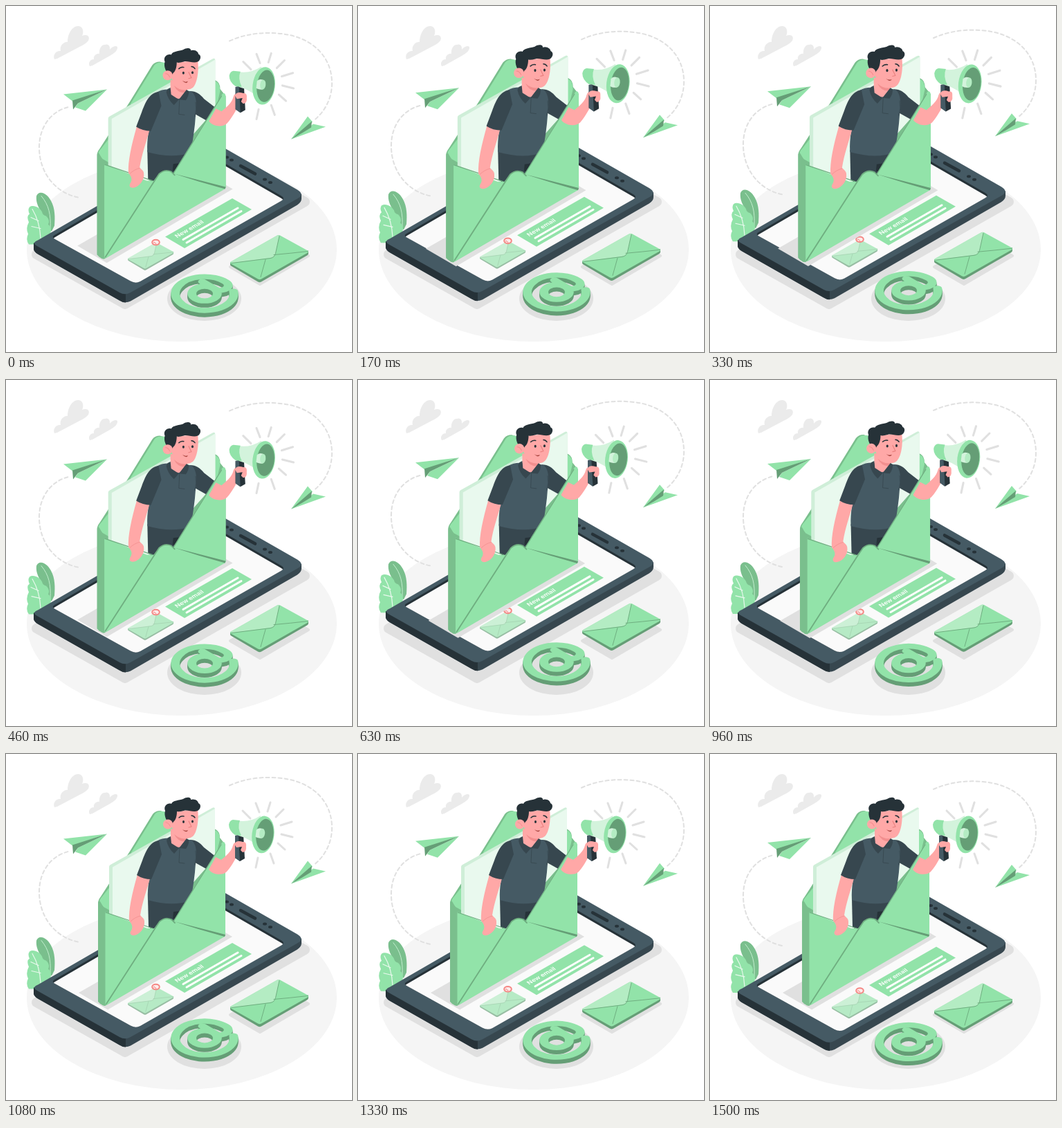
Animation of 500x500 px, one loop 1.54 s. Source, as an HTML page:

```html
<!DOCTYPE html>
<html lang="en">
<head>
<meta charset="utf-8">
<title>New email</title>
<style>
html, body { margin: 0; width: 100%; height: 100%; overflow: hidden; background: #fff; }
svg { display: block; width: 100%; height: 100%; }
.g { fill: #92e3a9; } .m { fill: #7abf8d; } .d { fill: #659e76; }
.k { fill: #263238; } .n { fill: #37474f; } .t { fill: #455a64; }
.s { fill: #ffa8a7; } .sh { fill: #e0e0e0; } .c { fill: #ebebeb; }
.line { fill: none; stroke-linecap: round; stroke-linejoin: round; }
.dash { fill: none; stroke: #e0e0e0; stroke-width: 2; stroke-dasharray: 5 4; stroke-linecap: round; }
</style>
</head>
<body>
<svg viewBox="0 0 500 500">
<defs>
  <clipPath id="hole"><path id="rim" d="M71 331 L282 208 L398 275 Q404 278.500 398 282 L194 398.500 Q187 402 180 398 L70 337 Q65 334 71 331Z"/></clipPath>
  <g id="mail">
    <path class="d" d="M324 371 L324 374 Q324 375.500 326 376.500 L364 399 Q366.500 400.500 369 399 L435 361 Q437 360 437 358 L437 354Z"/>
    <path class="g" d="M325 370 L392 332 Q394 331 396 332 L436 354 Q438 355.500 436 357 L369 395 Q366.500 396.500 364 395 L325 373 Q323 371.500 325 370Z"/>
    <path fill="#b4ecc3" d="M325 370 L392 332 Q394 331 395 332.500 L389.500 358 Q388 363.500 382 364.500 L326 372Z"/>
    <path class="line" stroke="#6fae80" stroke-width="1" d="M326 372 L382 365 Q388 364 389.500 358 L395 333 M387 360 Q410 358 436 355 M375 367 L368 392"/>
  </g>
  <path id="at" class="line" stroke-linecap="butt" stroke-width="10.500" transform="matrix(.866 -.5 .866 .5 287 416)"
    d="M15 0 A15 15 0 1 1 -15 0 A15 15 0 1 1 15 0 M15.500 -19 L15.500 3 C15.500 14 34.500 14 34.500 0 A34.500 34.500 0 1 0 27.500 20.800"/>
</defs>

<rect width="500" height="500" fill="#fff"/>
<ellipse cx="254" cy="352" rx="224" ry="133" fill="#f5f5f5"/>
<path class="c" d="M70 77 C67 70 73 64 79 65 C77 58 83 51 89 52 C89 40 96 29 104 29 C111 29 113 37 110 43 C117 40 122 44 119 50 Q117 53 112 56 L74 76Z"/>
<path class="c" d="M121 87 C118 82 122 77 127 77 C126 72 131 68 135 69 C134 61 139 55 143 56 C147 54 151 58 150 63 C154 58 162 56 161 61 C160 66 155 69 150 72 L125 86Z"/>
<path class="sh" stroke="#e0e0e0" stroke-width="14" stroke-linejoin="round" d="M44 359 L172 431 L432 283 L300 208Z"/>
<path class="sh" stroke="#e0e0e0" stroke-width="4" stroke-linejoin="round" d="M324 377 L394 337 L437 361 L367 402Z"/>
<ellipse class="sh" cx="286.500" cy="423" rx="53.500" ry="32"/>

<g class="float">
  <path class="m" d="M44 275 C47 267 58 269 65 282 C71 293 71 306 70 318 L66 326 L56 318 C57 300 42 292 44 275Z"/>
  <path class="line" stroke="#c3eecf" stroke-width="1" d="M51 275 C62 288 65 302 64 322"/>
  <path class="g" d="M34 291 C40 287 49 292 52 298 Q53 303 58 304 Q64 310 61 316 Q67 321 64 330 L48 345 L33 345 Q28 338 32 330 Q28 322 33 313 Q29 304 34 301 Q31 295 34 291Z"/>
  <path class="line" stroke="#e9f9ee" stroke-width="1.200" d="M38 294 C44 304 49 316 50 336 M47 311 L36 306 M50 322 L37 319"/>

  <path class="dash" d="M104 277 C70 270 48 240 48 205 C48 175 65 152 92 146"/>
  <path class="dash" d="M323 51 C345 41 370 38 392 40 C440 43 471 72 471 112 C471 135 460 153 447 164"/>
  <path class="g" d="M83 128 L146 121 L96 138Z M104 141 L146 121 L115 152 L100 147Z"/>
  <path class="d" d="M96 137 L146 121 L104 141 L97 150Z"/>
  <path class="g" d="M412 193 L436 160 L443 168Z M412 193 L444 171 L462 175Z"/>
  <path class="d" d="M412 193 L442 167 L441 176 L428 184Z"/>

  <path class="n" d="M40 343 L40 352 Q41 356 46 359 L164 426 Q172 431 180 427 L421 288 Q427 284 427 279 L427 272Z"/>
  <path class="k" d="M40 343 L40 352 Q41 356 46 359 L164 426 Q168 429 173 429 L173 412Z"/>
  <path class="t" d="M46 339 L296 194.500 L421 266 Q432 272.500 421 279 L180 414.500 Q172 419 164 414.500 L46 348 Q36 343 46 339Z"/>
  <use href="#rim" class="k"/>
  <g clip-path="url(#hole)"><use href="#rim" y="3.500" fill="#fafafa"/></g>
  <path class="line" stroke="#263238" stroke-width="4.500" d="M339 231.500 L360 243"/>
  <g class="k"><ellipse cx="326" cy="223" rx="3" ry="2"/><ellipse cx="319" cy="219" rx="3" ry="2"/><ellipse cx="374" cy="251" rx="3" ry="2"/><ellipse cx="382" cy="255.500" rx="3" ry="2"/></g>

  <path class="g" d="M230 334 L327 278.500 L355 294.500 L258 350.500Z"/>
  <text transform="matrix(.866 -.5 .72 .6 247.500 335.800)" font-family="Inter, Roboto, sans-serif" font-size="9" font-weight="600" fill="#fff">New email</text>
  <path class="line" stroke="#fff" stroke-width="3" d="M256 338 L335 292.500 M261 342.500 L340 297"/>
  <use href="#mail" transform="translate(-13.500 148.500) scale(.585)" opacity=".65"/>
  <ellipse cx="216.500" cy="342" rx="5.300" ry="3.800" fill="#fdecec" stroke="#f58784" stroke-width="2"/>
  <text transform="matrix(.866 -.5 .72 .6 216.800 344.600)" font-family="Inter, Roboto, sans-serif" font-size="6.500" font-weight="700" fill="#f58784" text-anchor="middle">1</text>
</g>

<g id="beat">
  <path class="sh" d="M105 345 L147 369.500 L327 264 L300 248 L133 329Z"/>
  <path class="line" stroke="#e0e0e0" stroke-width="3" stroke-linecap="butt" d="M382 70 L378 83 M401 80 L390 91 M413 98 L397 103 M414 120 L398 116 M403 138 L393 129 M387 158 L382 144 M361 164 L364 150 M361 71 L366 84 M342 82 L353 93"/>

  <path class="m" d="M133 216 Q133 211 137 206 L180 139 L212 87 Q216 82 223 82 L303 109 Q309 112 309 121 L317 131 L317 262 L143 364 L133 358Z"/>
  <path class="g" d="M181 142 L215 87 Q219 82 228 83 L302 110 Q309 112 309 124 L303 150 L190 190Z"/>
  <path class="g" d="M135 214 Q135 210 139 206 L150 192 L150 226 L141 221Z"/>
  <path fill="#cfeed8" d="M149 163 Q149 161 151 160 L298 78 Q302 76 302 80 L302 150 L205 260 L149 234Z"/>
  <path fill="#e9f9ee" d="M154 163.500 L302 79 L302 150 L205 260 L154 236Z"/>

  <path class="n" d="M205 208 L267 212 L262 242 L226 262 L206 250Z"/>
  <path class="k" d="M242 228 L250 227 L247 238 L241 238Z"/>
  <path class="n" d="M266 124 C275 124 280 128 286 135 L304 149 Q302 161 293 168 L268 154Z"/>
  <path class="t" d="M218 126 C225 121 234 121 240 122 L266 124 C274 126 277 140 274 158 C273 176 270 194 267 212 Q240 221 205 211 C204 190 208 176 211 160Z"/>
  <path class="line" stroke="#37474f" stroke-width=".8" d="M274 140 Q276 150 273 160 M251 136 L250 157 L258 158"/>

  <path class="s" d="M238 108 L263 112 L260 129 Q251 140 238 130Z"/>
  <path fill="#f28f8f" d="M243 116 Q252 124 262 122 L261 126 Q249 128 243 116Z"/>
  <path class="n" d="M234 121 L238 119 L239 129 L250 136 L243 144 Q234 136 232 125Z M261 122 L264 124 Q265 130 260 137 L250 136Z"/>
  <path class="s" d="M239 84 L277 80 C279 96 276 113 270 119 Q264 124 255 121 C246 117 240 110 238 100Z"/>
  <path class="k" d="M239 103 C231 98 228 88 230 82 C227 75 234 70 239 72 C241 67 250 67 256 65 C262 61 268 63 267 66 C273 64 278 68 278 71 C283 73 281 80 277 82 C271 85 262 80 257 82 Q250 84 247 83 C247 90 245 96 242 98Z"/>
  <circle class="s" cx="234" cy="101.500" r="7"/>
  <path class="line" stroke="#f28f8f" stroke-width="1" d="M231 99 Q235 99 237 104"/>
  <g class="k"><ellipse cx="256.500" cy="98" rx="1.500" ry="2"/><ellipse cx="269.500" cy="97.500" rx="1.500" ry="2"/></g>
  <path class="line" stroke="#263238" stroke-width="1.500" d="M250 92 Q253 89 257 90 M268 89 Q271 89 273 92"/>
  <path class="line" stroke="#e8807f" stroke-width="1.100" d="M264 97 L268 105 L264 106"/>
  <path fill="#a8443f" d="M255 109 Q259 112 263 110 Q261 115 255 109Z"/>

  <path class="m" d="M133.500 216 Q133 211 136 213 L144 227 L144 363 Q141 365 138 362 Q133.500 360 133.500 356Z"/>
  <path class="g" d="M143.500 228 L204 252 L214 252 L222 242 Q230 234 242 241 L311 130 Q313 125 316 128 Q317 130 317 133 L317 261 Q317 264 314 265 L147 362 Q143.500 364 143.500 360Z"/>
  <path class="line" stroke="#6fae80" stroke-width="1.800" d="M145 361 L216 251 L222 242 Q230 235 239 239 L244 244"/>
  <path class="line" stroke="#6fae80" stroke-width="1.200" d="M144 229 L212 252 M242 242 L311 131"/>
  <path class="d" d="M243 242 L317 261 L316 264 L278 253Z"/>

  <path class="s" d="M190 174 C182 202 177 225 178 241 C182 246 184 250 181 255 C178 259 180 263 186 262 C194 260 201 251 200 242 C200 237 195 235 194 233 C197 214 203 198 208 180Z"/>
  <path class="line" stroke="#f28f8f" stroke-width=".8" d="M180 242 Q186 236 194 234"/>
  <path class="n" d="M221 125 C207 127 202 141 197 154 L189 175 Q198 181 210 181 L225 145Z"/>

  <path class="s" d="M303 149 L293 167 C299 175 313 176 319 170 C328 160 332 149 337 143 L336 127 Q329 127 328 132 C326 141 317 148 311 153Z"/>
  <path class="k" d="M331 118 L343 116 L345 151 L338 155 L331 150Z"/>
  <path class="t" d="M331 118 L336 117 L338 155 L331 150Z"/>
  <path class="s" d="M330 130 Q333 124 342 127 Q348 126 347 134 Q348 141 342 142 L339 139 L341 134 L333 135Z"/>
  <path fill="#d3f3dc" d="M333 96 Q351 100 368 89 L372 141 Q354 122 336 118Z"/>
  <path class="g" d="M328 95 L338 96 Q334 106 340 118 L331 117 Q322 111 322 102 Q323 96 328 95Z"/>
  <g transform="rotate(7 372 116)">
    <ellipse class="g" cx="371.500" cy="116.500" rx="16" ry="27"/>
    <ellipse class="d" cx="374" cy="116.500" rx="12.500" ry="23"/>
    <path fill="#d3f3dc" d="M361 111 Q363 107 369 108 Q375 114 370 122 Q364 123 361 121Z"/>
    <ellipse fill="#b4ecc3" cx="370" cy="115" rx="4" ry="7"/>
  </g>
</g>

<g class="float">
  <use href="#mail"/>
  <g stroke="#659e76"><use href="#at" y="6"/><use href="#at" y="4"/><use href="#at" y="2"/></g>
  <use href="#at" stroke="#92e3a9"/>
</g>
</svg>
<script>
const LOOP = 1540, LEAD = 35, RISE = 10;
const floats = document.querySelectorAll(".float");
const beat = document.getElementById("beat");

// [ms, growth] of the double pulse
const pulse = [[0, .011], [210, .05], [330, .042], [490, .004], [630, .02], [790, .049],
  [830, .047], [1080, 0], [1500, 0], [LOOP, .011]];

function growth(t) {
  const i = pulse.findIndex(p => p[0] > t);
  const [t0, a] = pulse[i - 1], [t1, b] = pulse[i];
  return a + (b - a) * (t - t0) / (t1 - t0);
}

function draw(t) {
  const phase = (t + LEAD) % LOOP / LOOP;
  const y = -RISE * (1 - Math.abs(1 - 2 * phase));
  floats.forEach(g => g.setAttribute("transform", `translate(0 ${y.toFixed(3)})`));
  beat.setAttribute("transform", `translate(270 213) scale(${(1 + growth(t)).toFixed(5)}) translate(-270 -213)`);
}

const start = performance.now();
function tick() {
  draw((performance.now() - start) % LOOP);
  requestAnimationFrame(tick);
}
tick();
</script>
</body>
</html>
```
